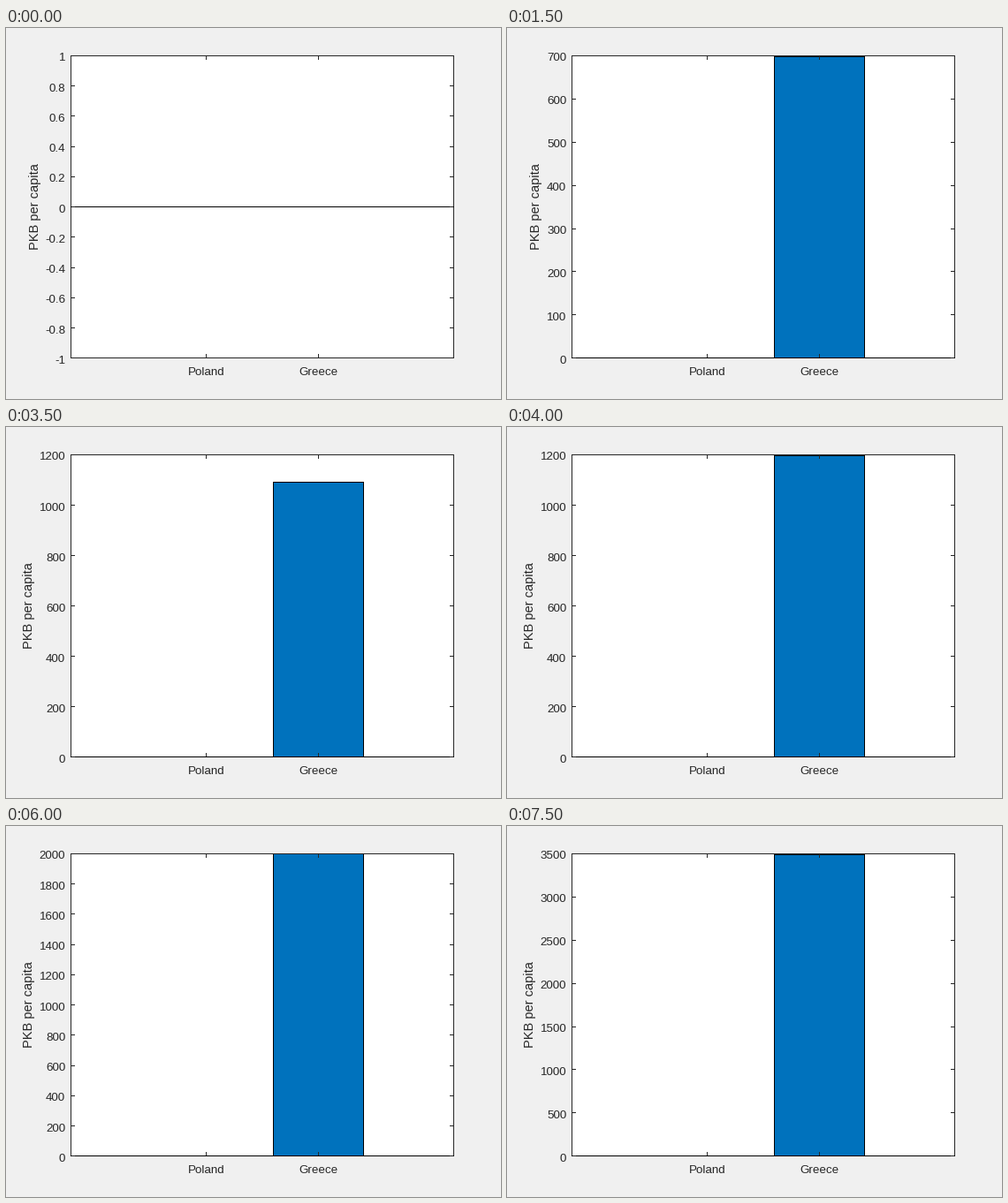
A matplotlib script that plays this animation: 560 by 420 pixels, repeating every 8 s.

```python
import math

import matplotlib.pyplot as plt
from matplotlib.animation import FuncAnimation
from matplotlib.patches import Rectangle

plt.rcParams["font.family"] = "Liberation Sans"

W, H, DPI = 560, 420, 100
LEFT, RIGHT, TOP, BOTTOM = 73, 506, 31.45, 373.8
INK, BLUE = "#262626", "#0072BD"
TICK_LENGTH = 4
BAR_WIDTH = 103
COUNTRIES = {"Poland": 226, "Greece": 353}

# Yearly values for the second country, one per half second.
GREECE = [0, 0, 620.2, 698, 777, 899.6, 990, 1091.3, 1196.5, 1365,
          1544, 1755, 1999, 2430, 2880, 3490]

fig = plt.figure(figsize=(W / DPI, H / DPI), dpi=DPI, facecolor="#F0F0F0")
ax = fig.add_axes([0, 0, 1, 1])


def box(x, y, w, h, color):
    ax.add_patch(Rectangle((x, y), w, h, facecolor=color, edgecolor="none",
                           linewidth=0, antialiased=False))


def label(x, y, text, px=13.333, **kw):
    ax.text(x, y, text, fontsize=px * 72 / DPI, color=INK, va="baseline", **kw)


def axis_scale(value):
    """Lower limit, upper limit and tick step that hold the value."""
    if value == 0:
        return -1, 1, 0.2
    step = 100 if value <= 1000 else 200 if value <= 2000 else 500
    return 0, math.ceil(value / step) * step, step


def draw_bar(x, base, top):
    left = x - BAR_WIDTH // 2
    box(left, top, BAR_WIDTH, base - top + 1, "black")
    if base - top > 1:
        box(left + 1, top + 1, BAR_WIDTH - 2, base - top - 1, BLUE)


def draw_frame(low, high, to_y, values):
    top, bottom = int(TOP), int(BOTTOM)
    width, height = RIGHT - LEFT + 1, bottom - top + 1
    box(LEFT, top, width, height, "white")
    base = int(to_y(0))
    for x, value in zip(COUNTRIES.values(), values):
        draw_bar(x, base, int(to_y(value)))
    for y in (top, bottom):
        box(LEFT, y, width, 1, INK)
    for x in (LEFT, RIGHT):
        box(x, top, 1, height, INK)
    box(LEFT, base, width, 1, "black")
    for name, x in COUNTRIES.items():
        box(x, top + 1, 1, TICK_LENGTH, INK)
        box(x, bottom - TICK_LENGTH, 1, TICK_LENGTH, INK)
        label(x + 0.3, 393, name, ha="center")


def update(i):
    ax.clear()
    ax.set_xlim(0, W)
    ax.set_ylim(H, 0)
    ax.axis("off")

    value = GREECE[i]
    low, high, step = axis_scale(value)

    def to_y(v):
        return BOTTOM - (v - low) / (high - low) * (BOTTOM - TOP)

    draw_frame(low, high, to_y, (0, value))
    for k in range(round((high - low) / step) + 1):
        tick = round(low + k * step, 1)
        y = to_y(tick)
        box(LEFT + 1, int(y), TICK_LENGTH, 1, INK)
        box(RIGHT - TICK_LENGTH, int(y), TICK_LENGTH, 1, INK)
        label(67.3, math.ceil(y + 5.5), f"{tick or 0:g}", ha="right")

    label(30 if high >= 1000 else 37, 202, "PKB per capita", px=14.667,
          ha="center", rotation=90, rotation_mode="anchor")
    return []


anim = FuncAnimation(fig, update, frames=len(GREECE), interval=500,
                     init_func=lambda: [], repeat=True, repeat_delay=0)
plt.show()
```
